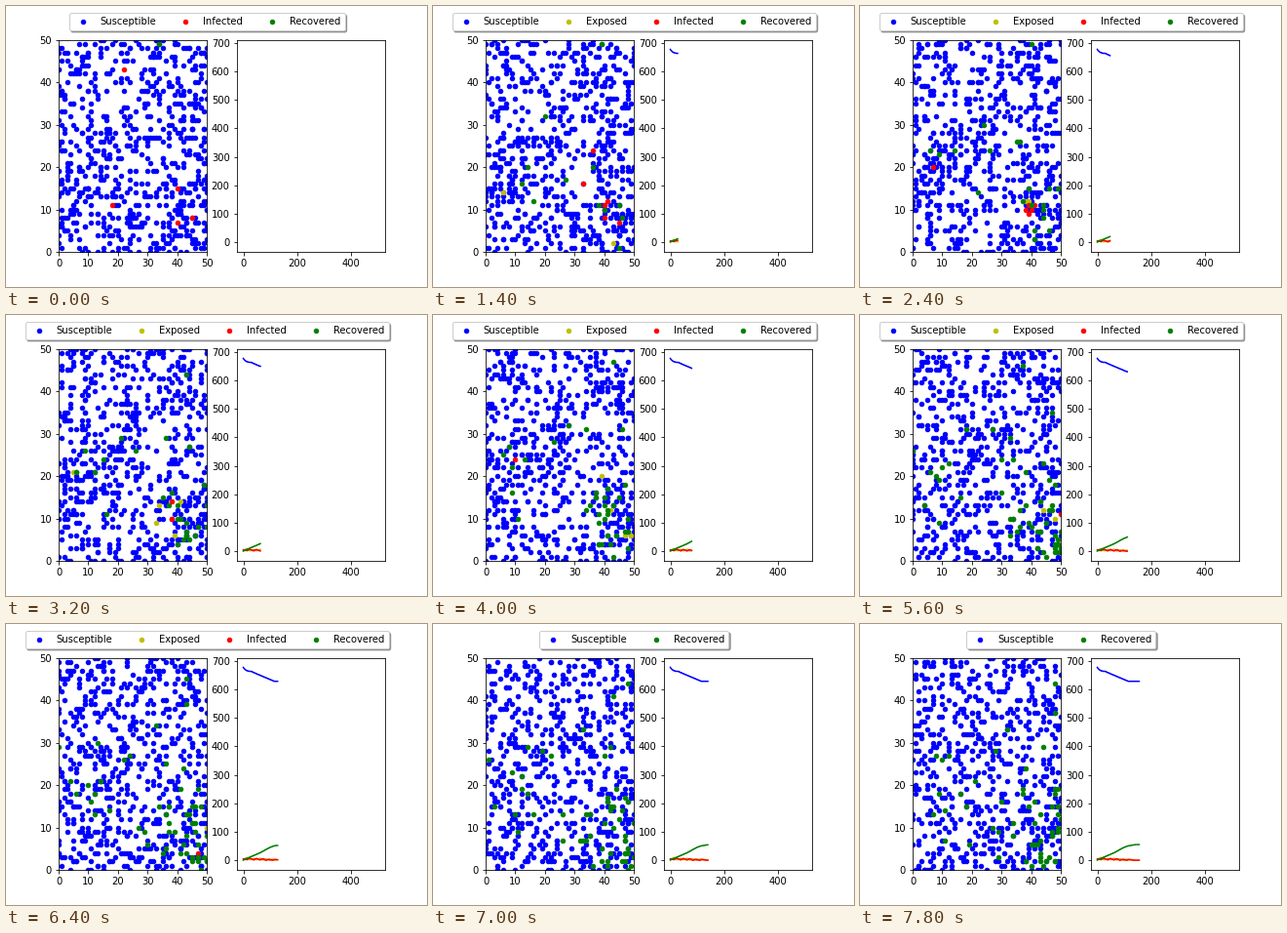
Animation, 432 px wide and 288 px high, one loop 8000 ms. Source, as a matplotlib script:

```python
import numpy as np
import matplotlib.pyplot as plt
from matplotlib.animation import FuncAnimation

FRAMES, STRIDE = 40, 4
STEPS = FRAMES * STRIDE
PEOPLE, SIDE = 684, 50
GROUPS = [("Susceptible", "b"), ("Exposed", "y"), ("Infected", "r"), ("Recovered", "g")]
FIRST_CASES = [(34, 49), (22, 43), (40, 15), (18, 11), (45, 8), (40, 7)]

plt.rcParams["font.family"] = "DejaVu Sans"
plt.rcParams["font.size"] = 10

# Running totals of people who have reached each stage: an early burst,
# then a steady spread; the infected share of the sick rises and falls.
steps = np.arange(STEPS)
burst = 15 * (1 - np.exp(-steps / 9))
spread = 34 * np.clip((steps - 30) / 85, 0, 1)
exposed = np.round(len(FIRST_CASES) + burst + spread).astype(int)
recovered = np.round(np.interp(steps, [0, 64, 96, 112, 142],
                               [1, 27, 44, 50, 55])).astype(int)
share = 0.5 + 0.35 * np.cos(2 * np.pi * (steps - 96) / 24)
infected = recovered + np.floor((exposed - recovered) * share).astype(int)
infected = np.maximum.accumulate(np.maximum(infected, len(FIRST_CASES)))
curves = [PEOPLE - exposed, exposed - infected, infected - recovered, recovered]


def reflect(x):
    """Fold a free walk back between the walls."""
    x = x % (2 * SIDE + 2)
    return np.minimum(x, 2 * SIDE + 1 - x)


def walk():
    """Random walks of all people, numbered in the order they fall ill."""
    rng = np.random.default_rng(7)
    moves = rng.integers(-1, 2, (STEPS, PEOPLE, 2))
    moves[0] = rng.integers(0, SIDE + 1, (PEOPLE, 2))
    moves[0, :len(FIRST_CASES)] = FIRST_CASES
    path = moves.cumsum(axis=0)
    # Everyone else meets an infected person at the moment of exposure.
    for t in range(1, STEPS):
        for person in range(exposed[t - 1], exposed[t]):
            last = infected[t - 1]
            carrier = rng.integers(min(recovered[t - 1], last - 1), last)
            path[:, person] += path[t, carrier] - path[t, person]
    return reflect(path)


path = walk()

fig, (field, chart) = plt.subplots(1, 2, figsize=(6, 4), dpi=72)
fig.subplots_adjust(left=0.125, right=0.9, bottom=0.125, top=0.88, wspace=0.2)
field.set(xlim=(0, SIDE), ylim=(0, SIDE))
chart.set(xlim=(-25, 525), ylim=(-33.9, 711.9))

dots = [field.scatter([], [], s=20, color=color, label=name) for name, color in GROUPS]
lines = [chart.plot([], [], color=color, lw=1.5)[0] for _, color in GROUPS]


def update(frame):
    t = frame * STRIDE
    bounds = [PEOPLE, exposed[t], infected[t], recovered[t], 0]
    shown = []
    for dot, line, curve, end, start in zip(dots, lines, curves, bounds, bounds[1:]):
        dot.set_offsets(path[t, start:end])
        line.set_data(steps[:t], curve[:t])
        if end > start:
            shown.append(dot)
    field.legend(handles=shown, loc="upper center", bbox_to_anchor=(1, 1.15),
                 ncol=4, fancybox=True, shadow=True, scatterpoints=1)
    return dots + lines


anim = FuncAnimation(fig, update, frames=FRAMES, interval=200,
                     init_func=lambda: update(0), repeat=True, repeat_delay=0)
plt.show()
```
